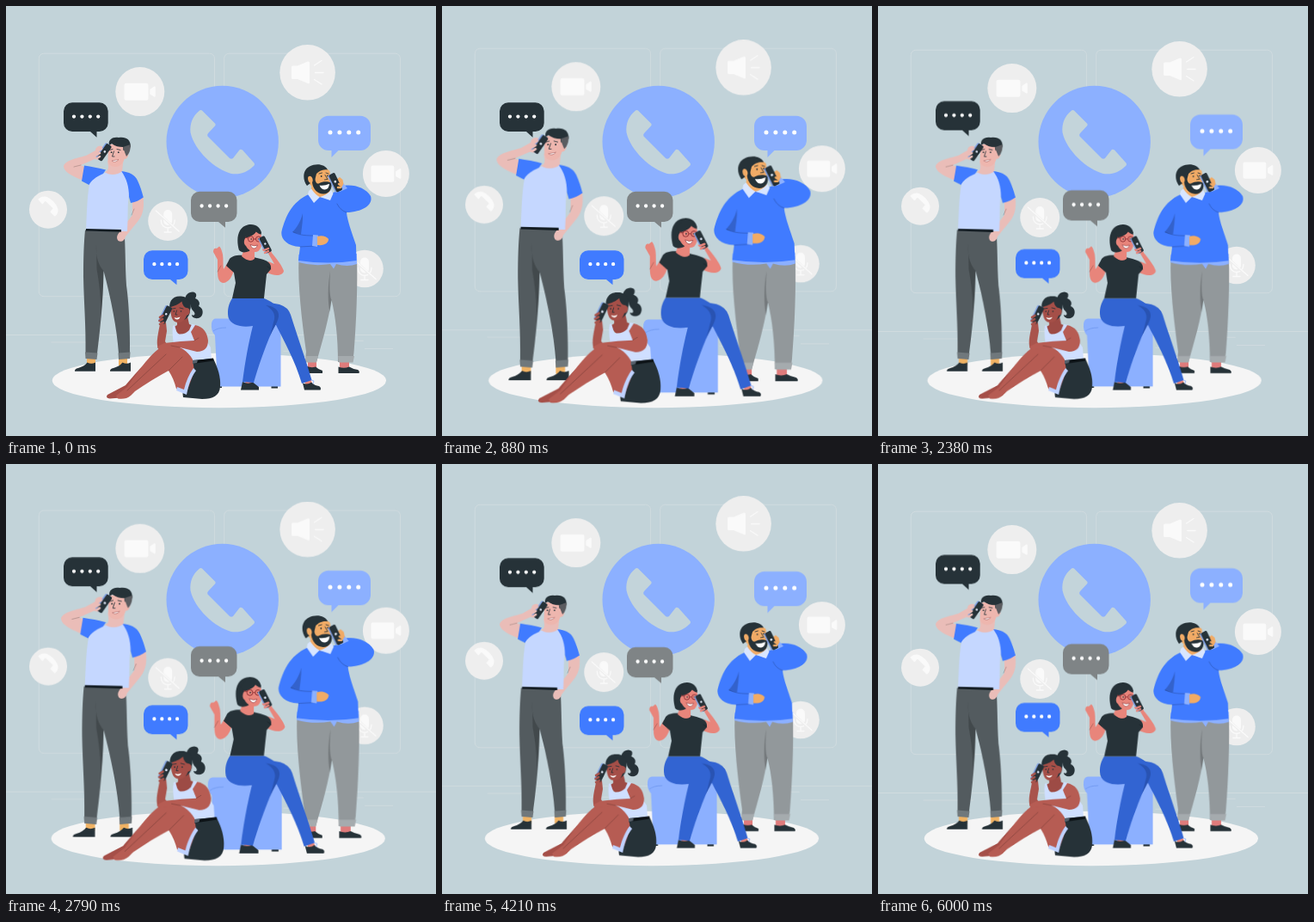
Write an HTML page that moves like this. It is 500 px wide and 500 px high and loops after 6040 ms.

```html
<!DOCTYPE html>
<html lang="en">
<head>
<meta charset="utf-8">
<title>Phone calls</title>
<style>
html, body { margin: 0; width: 100%; height: 100%; overflow: hidden; background: #c2d3d9; }
svg { display: block; width: 100vw; height: 100vh; }

.float, .bob, .shake, .beat { animation: 6.04s linear infinite; }
.float { animation-name: float; }
.bob { animation-name: bob; }
.shake { animation-name: shake; }
.beat { animation-name: beat; }

/* 3 s triangle wave */
@keyframes float {
  0%, 49.669%, 99.338% { transform: translateY(0); }
  24.834%, 74.503% { transform: translateY(-9.8px); }
  100% { transform: translateY(-.26px); }
}
/* 1 s rest, then a 1.5 s triangle wave cut off by the loop */
@keyframes bob {
  0%, 16.556%, 41.391%, 66.225%, 91.06% { transform: translateY(0); }
  28.974%, 53.808%, 78.642% { transform: translateY(-9.8px); }
  100% { transform: translateY(-7.06px); }
}
@keyframes shake {
  0%, 99.338%, 100% { transform: translateX(0); }
  9.934%, 89.404% { transform: translateX(-1px); }
  19.868%, 79.47% { transform: translateX(2px); }
  29.801%, 49.669%, 69.536% { transform: translateX(-4px); }
  39.735%, 59.603% { transform: translateX(4px); }
}
@keyframes beat {
  0%, 29.801%, 39.735%, 59.603%, 100% { transform: scale(1); }
  9.934%, 49.669% { transform: scale(1.1); }
}

.dark { fill: #263238; }
.blue { fill: #407bff; }
.soft { fill: #8cb0ff; }
.pale { fill: #c5d7ff; }
.disc { fill: #eee; }
.icon { fill: #fafafa; }
.ray { fill: none; stroke: #fafafa; stroke-width: 1.3; stroke-linecap: round; }
.dots { fill: none; stroke: #fff; stroke-width: 4.3; stroke-linecap: round; }
.thin { fill: none; stroke: #263238; stroke-width: .8; stroke-linecap: round; stroke-linejoin: round; }
.fold { fill: none; stroke: #000; stroke-opacity: .28; stroke-width: .7; stroke-linecap: round; }
.shade { fill: #000; fill-opacity: .2; }
</style>
</head>
<body>
<svg viewBox="0 0 500 500">
  <defs>
    <path id="handset" d="M224.500 122Q226.500 120 228.500 122L243 136.500Q244.500 138 243 139.500L235 148Q233.500 149.500 234.500 151.500L260 177Q262 178.500 264 177L271 168Q272.500 166 275 167.500L288 182Q290 184 288 186C281 193 272 196.500 262 195C243 190 219 168 214.500 147C213.500 137 217 128 224.500 122Z"/>
    <g id="camera">
      <rect x="-18.3" y="-9.8" width="28" height="20" rx="2.2"/>
      <path d="M11.500-2.500L16.500-6Q18-6.500 18-5V5Q18 6.500 16.500 6L11.500 3Z"/>
    </g>
    <g id="mic">
      <rect class="icon" x="-5" y="-13" width="10" height="18" rx="5"/>
      <path class="ray" d="M-8-1C-8 11 8 11 8-1M0 8V13M-4 13H4"/>
      <path d="M-13-11L13 13" fill="none" stroke="#eee" stroke-width="3"/>
      <path class="ray" d="M-14-12L13 12"/>
    </g>
    <g id="mobile">
      <rect x="-4.800" y="-10.500" width="8" height="21" rx="1.600" fill="#7e9ee0"/>
      <rect class="dark" x="-3.300" y="-10.500" width="7.200" height="21" rx="1.600"/>
      <circle cx="0.300" cy="-1" r="1.300" fill="#dfe6f5"/>
    </g>
  </defs>

  <g class="float">
    <g fill="none" stroke="#ebebeb" stroke-width=".35">
      <rect x="38.300" y="55.200" width="204.200" height="282.500" rx="5.700"/>
      <rect x="253.700" y="55.200" width="204.700" height="282.500" rx="5.700"/>
      <path d="M0 382.500H500M416.800 398.600H450M322.500 401.300h8.700M396.600 389.300h19.200M52.500 391h43.200M104.600 391h6.300M131.500 395.200h93.700"/>
    </g>
    <g class="disc">
      <circle cx="155.800" cy="99.600" r="28.500"/>
      <circle cx="350.600" cy="77.300" r="32.300"/>
      <circle cx="441.900" cy="195" r="27"/>
      <circle cx="49" cy="236.700" r="22"/>
      <circle cx="188.200" cy="250" r="23"/>
      <circle cx="417" cy="305.500" r="21.800"/>
    </g>
    <g class="icon">
      <use href="#camera" x="155.800" y="99.500"/>
      <use href="#camera" x="442" y="195" transform="translate(17.700 7.800) scale(.96)"/>
      <use href="#handset" transform="translate(127 282) rotate(180) scale(.31)"/>
      <path d="M332 71Q332 69.500 333.500 69.500H339L351 64.500Q353 64 353 66V89Q353 91 351 90L339 85H333.500Q332 85 332 83.500Z"/>
    </g>
    <path class="ray" d="M358.500 69L367 63.500M359.500 77.500H369M358.500 85.500L367 91"/>
    <use href="#mic" x="188.200" y="250"/>
    <use href="#mic" x="417" y="305.500"/>
  </g>

  <circle class="soft" cx="251.700" cy="158" r="65.200"/>
  <use href="#handset" fill="#c3d4da"/>

  <ellipse class="shake" cx="247.900" cy="435.500" rx="194.100" ry="31.700" fill="#f5f5f5"/>

  <g class="bob">
    <path class="dark" d="M77 112.300H108.700a10 10 0 0 1 10 10V136a10 10 0 0 1-10 10H105.500V152.800L98 146H77a10 10 0 0 1-10-10V122.300a10 10 0 0 1 10-10Z"/>
    <path class="dots" stroke-dasharray="0 9.400" d="M79 128.600h29"/>
    <path class="soft" d="M375 127.800H412a12 12 0 0 1 12 12V156a12 12 0 0 1-12 12H386.500L378.500 176V168H375a12 12 0 0 1-12-12V139.800a12 12 0 0 1 12-12Z"/>
    <path class="dots" stroke-dasharray="0 10.900" d="M377 147h33.500" style="stroke-width:5px"/>
    <path fill="#7f8486" d="M225 215.800H258.500a10 10 0 0 1 10 10V241a10 10 0 0 1-10 10H255V257.800L247 251H225a10 10 0 0 1-10-10V225.800a10 10 0 0 1 10-10Z"/>
    <path class="dots" stroke-dasharray="0 9.500" d="M227.600 232.500h29.500"/>
    <path class="blue" d="M170 284.300H201.500a10 10 0 0 1 10 10V308a10 10 0 0 1-10 10H198.500V324.300L191 318H170a10 10 0 0 1-10-10V294.300a10 10 0 0 1 10-10Z"/>
    <path class="dots" stroke-dasharray="0 8.900" d="M172.400 300.200h27.600"/>
  </g>

  <!-- standing man, left -->
  <g class="beat" style="transform-origin:113.200px 288.500px">
    <path d="M94 408H104V418H94ZM131 408H141V418H131Z" fill="#f0b263"/>
    <path class="dark" d="M104 414.500V424.800H80Q79.500 422 84 421Q91 419 94.500 414.500Q99 417 104 414.500ZM145 414.500V424.800H121Q120.500 422 125 421Q132 419 135.500 414.500Q140 417 145 414.500Z"/>
    <path fill="#535b5f" d="M92 260.500L137.500 261C139 280 138.500 300 140 325C143 345 144.500 380 144 404H131C129 375 122 340 113.500 308C113 345 109 380 106 404H92.500C93 370 90.500 345 90 315C90 293 90.500 276 92 260.500Z"/>
    <path class="shade" d="M105 277C104 292 108 302 113.500 308C113 330 112 345 110 364C111 340 108 320 105.500 306Z"/>
    <path fill="#70787c" d="M92 402.500L106.500 403.500L105.500 411L92.500 410ZM130.500 403.500L144.500 402.500L144 410L131 411Z"/>
    <path fill="#eabdb8" d="M147 226L159.500 222C161.500 237 158 245 152 252L139 268C138 273 134 275 130.500 273C128 270 129 266 132 263L147 243Z"/>
    <path fill="#eabdb8" d="M92 204C80 199 68 194 67 187C67 180 82 177 93 174L104 168C104 164 108 162 111 163L116 166L113 176C110 180 106 179 103 178L87 185L93 188Z"/>
    <path class="pale" d="M114 194L134 192L149 202L142.500 222C141 235 142 248 141 262L93 261C94 242 94 225 97 207L104 196Z"/>
    <path class="blue" d="M91 185.500C99 187 108 188 116 190.500L113 195C104 199 99 203 96.500 208L88 203.500ZM134 192C143 193 150 196 153 203C156 209 158 216 159.800 222.500C155 226 151 228 145 229L143 222C143 210 140 200 134 192Z"/>
    <path fill="#eabdb8" d="M118 180L137 175L135 192C130 197 119 197 115 193Q119 192 119 187Z"/>
    <path d="M93 259L134 260V262.800L93 261.500Z" fill="#111a20"/>
    <path class="fold" d="M87 185L79 187M146 243L149 236"/>
    <path fill="#eeb6ae" d="M119.500 161L118.500 177C118.500 184 122 187 127 187C133 187 136.500 182 137.500 178C142 178 144 171 140.500 169L139 160Z"/>
    <path class="dark" d="M120 162C118.500 157 122.500 151.500 131 153C140 151.500 145.500 156 144.700 164L141 168L136.500 168L136 164C131 164 127 163 123 160Z"/>
    <path d="M136 164L144.700 161C145 168 143 172 140 175L138 170Z" fill="#5b5c60"/>
    <path class="thin" d="M120.500 167.500L124 166.500M129 166.500L133 167.500M125.500 169L123.500 175H126"/>
    <path d="M123 180Q127 183 131 178.500Z" fill="#fff" stroke="#a05050" stroke-width=".5"/>
    <circle class="dark" cx="122.600" cy="170.200" r=".9"/><circle class="dark" cx="130.800" cy="170.200" r=".9"/>
    <use href="#mobile" transform="translate(114 170) rotate(35)"/>
    <path d="M106 169L111 166M105 173L109 171M106 177L109 175" stroke="#eabdb8" stroke-width="2.600" stroke-linecap="round"/>
  </g>

  <!-- standing man, right -->
  <g class="beat" style="transform-origin:372.500px 305.500px">
    <path d="M351 410H361V422H351ZM388 410H399V422H388Z" fill="#df7b7b"/>
    <path class="dark" d="M350 419Q355 421 360 419.500Q363 422.500 368 424V427H347ZM386.500 419.500Q393 422 399 419.500Q403 422 409 423Q411.500 424.500 410.500 427H386.500Z"/>
    <path fill="#92989b" d="M340.500 292H408C409 325 407.500 365 404.500 403L403 414H386C386 385 383 360 378.500 342C375 365 368 390 361 414H348L349 402C344 365 339 325 340.500 292Z"/>
    <path class="shade" d="M377 308C376 325 376 336 378.500 342L376.500 356C374 344 374 325 377 308Z"/>
    <path fill="#a5abae" d="M348.500 407H363L361 414.500H349ZM386 407H405L403.500 414.500H387Z"/>
    <path class="soft" d="M340 289L408 288L408 300Q397 304 384 300L381 305.500L377 300Q357 303 340 298Z"/>
    <path class="blue" d="M352 219C361 221 374 220 383 216L393 209C405 207 419 212 424 221C427 230 417 239 396 240C397 250 402 263 407 278L407.500 296Q375 301 340 296L342 280C326 279 319 270 320.500 262C325 245 332 228 352 219Z"/>
    <path class="shade" d="M345 241C343 250 338 258 333 263L343 265.500C344 257 345.500 249 345 241Z"/>
    <path class="fold" d="M334 263C342 267 351 267 358 267M342 280L360 279M396 240C390 238 387 234 385 230"/>
    <path class="soft" d="M357 266L363 266.500L362 280L356 279Z"/>
    <path fill="#f1ab66" d="M362 268C367 266 373 268 375 271C375 275 371 279 362 278Z"/>
    <path class="soft" d="M383 209L392 206L397 212L388 216Z"/>
    <path fill="#f1ab66" d="M356 206L376 212L379 220Q368 226 354 218Z"/>
    <path fill="#d8e5ff" d="M352 215L355 212.500Q360 220 365 222L358 229L351 219ZM378 214L380.500 218L377 226L365 222Q373 220 378 214Z"/>
    <path fill="#f1ab66" d="M353 196C348 196 347 202 352 206L357 211C365 219 378 213 378 206L376.500 192C373 187 357 186 353 196Z"/>
    <path class="dark" d="M350 209C344 201 345.500 190 353 186.500C361 182.500 371 184 374 190.500C368 189.500 364 192 361 195L359 203L356.500 204C358 199 352 195 351 200C351 203 352 205 354 206Z"/>
    <path class="dark" d="M356 205L359 200C360 206 362 207.500 364.500 206C368 203.800 374 203.500 378 205.500C380 211 376.500 218.500 369 218.500C362 218.500 357 213 356 205Z"/>
    <path d="M364.500 208.500Q370 209.500 376 206.800Q375.500 213 371 213.500Q366.500 213.500 364.500 208.500Z" fill="#fff"/>
    <path class="thin" d="M364 195L367.500 194M372 194L375 195M371 196.500L374 201.500L370.500 202"/>
    <circle class="dark" cx="366.700" cy="198" r=".9"/><circle class="dark" cx="374" cy="197.500" r=".9"/>
    <path fill="#f1ab66" d="M384 202L388 199L391.500 202L392.500 207L388 214L382 212Z"/>
    <use href="#mobile" transform="translate(383 205.300) rotate(-26) scale(1.050)"/>
    <path d="M388 203L390 207M386 211L389 211M387 207L390 209" stroke="#f1ab66" stroke-width="2.400" stroke-linecap="round"/>
  </g>

  <!-- woman on the pouf -->
  <g class="beat" style="transform-origin:302.300px 350.500px">
    <path class="dark" d="M243 440H251V444H243ZM308.500 440H316V444.500H308.500Z"/>
    <path class="soft" d="M244 363.500H315Q320 365 319.500 371V442.500H246L243 383Q238 378 239 369Q240 363.500 244 363.500Z"/>
    <path d="M241 378Q246 374 256 374" fill="none" stroke="#6e97ee" stroke-width=".7"/>
    <path fill="#e8857b" d="M346 433L354 433L357 442L349 442ZM279 432H287L286 442H278Z"/>
    <path class="dark" d="M275 437Q281 440 287 437.500L294 443V446.500H273ZM345 438.500Q351 441 355 437.500Q359 441.500 364 442Q367 443.500 365.500 446.500H347Z"/>
    <path fill="#3264d2" d="M290 342L318 347Q328 350 331 359C339 385 349 412 355.500 435L344 439C336 412 324 391 314 371L280 372Z"/>
    <path fill="#3264d2" d="M263 340H300C308 343 316 348 318 356C319 363 313 371 309 379C300 400 293 420 288 438L275 437C278 413 282 392 287 372C275 374 262 372 258.500 362C257 353 259 346 263 340Z"/>
    <path fill="#2953b2" d="M302 348C311 349 318 353 317 361C316 368 310 376 307 384L311 368C315 358 309 352 302 348Z"/>
    <path d="M355 435L358 436L357 439" class="thin" style="stroke:#8cb0ff"/>
    <path fill="#e8857b" d="M258 298L265 307C263 315 259 321 253 322C248 322 246 317 246 309L246 295L241 286C241 282 243 281 245 282L248 279.500C250 281 251 285 252 289C253 295 252 301 253 306Z"/>
    <path fill="#e8857b" d="M305 297L312 300L304 286L298 284L300 278L306 279L309 287C315 294 321 302 323 308C322 314 312 315 302 309Z"/>
    <path class="dark" d="M279 290C270 289 263 290 260 294L256 302L265 310L267 322L263 340H300C301 330 302 321 303 312L308 306C309 299 304 296 296 294Z"/>
    <path fill="#e8857b" d="M277 282L289 285V294Q283 299 274 291Z"/>
    <path class="dark" d="M271 284C267 270 270 257 281 254.500C289 252.500 296 257 297 264L291 268L283 285C278 287 274 287 271 284Z"/>
    <path fill="#e8857b" d="M280 268C284 268 289 266 291 262L296.500 265C298.500 273 298 280 294 284.500C289 288 282 285 279 279C276 277 276 271 280 268Z"/>
    <path class="dark" d="M278 270C285 268 289 265 290 262C293 264.500 295 265.500 297 265.500C296 258 289 254 281 256L275 264Z"/>
    <g fill="none" stroke="#8e3035" stroke-width=".9"><circle cx="284.700" cy="271" r="3.200"/><circle cx="293.500" cy="271" r="3"/><path d="M288 271H290.500M281.500 270L278 269"/></g>
    <circle class="dark" cx="285.200" cy="271" r=".8"/><circle class="dark" cx="293.500" cy="271" r=".8"/>
    <path d="M284 277.500Q288.500 280 292.500 278Q291 282.500 288 282Q285.500 281.500 284 277.500Z" fill="#fff" stroke="#8e3035" stroke-width=".6"/>
    <use href="#mobile" transform="translate(301.500 277.500) rotate(-27) scale(.95)"/>
    <path d="M300 284L305 282M301 287L305 285" stroke="#e8857b" stroke-width="2.400" stroke-linecap="round"/>
    <path class="fold" d="M246 309L250 302M308 306L304 303"/>
  </g>

  <!-- sitting girl -->
  <g class="beat" style="transform-origin:183.500px 395.200px">
    <path class="dark" d="M208 343C208 336 212 332.500 217 332.500C222 333 222 337 220 340C225 342 226 346 224 349C229 351 230 357 227 361C223 365 216 363 216 359C219 361 221 358 218 355C214 351 216 348 213 346Z"/>
    <path fill="#9d4b45" d="M199 364L211 361L213 370L224 374L205 386L194 374L199 371Z"/>
    <path fill="#a9544c" d="M179 370L186 368L187 378L185 390L190 398L178 400C174 394 176 385 179 370Z"/>
    <path fill="#cfdfff" d="M196 371L199 381Q207 383 213 377L216 370L221 371L238 397L239 412L217 416L196 398C194 389 193 380 194 372Z"/>
    <path class="dark" d="M217 412L241 410C246 420 250 431 249 443C248 453 241 457 228 457L206 455C204 446 209 431 217 412Z"/>
    <path fill="#a54f48" d="M190 396C171 402 153 425 139 441L118 452Q115 456 121 456.500L139 455L150 446L205 407Z"/>
    <path fill="#b65c53" d="M183 395C197 391 211 400 217 411L219 425L210 449L198 445C196 437 193 430 189 424C176 431 163 439 150 448L145 453Q139 458 130 456.500L128 453L141 443C152 428 166 405 183 395Z"/>
    <path fill="#bfd2ff" d="M218 421L221 424C214 433 212 443 210 452L198 447L199 443L207 446C209 437 213 428 218 421Z"/>
    <path fill="#0c1216" d="M217 412.500L241 409.500L241.500 412.500L217 416Z"/>
    <path d="M217 412L223 411.500L222 415L217 416Z" fill="#56606b"/>
    <path fill="#b65c53" d="M220 371C230 373 234 380 235 389C235 397 231 402 222 402L202 397L184 399Q176 400 176 396L184 392L203 390L219 389L215 379Z"/>
    <path class="fold" d="M219 389L224 386M202 397L192 395M189 424L205 408M141 447L186 405"/>
    <path class="dark" d="M191 355C188 345 193 337 203 337.500C212 337 217 346 214 354C214 359 211 363 207 365Z"/>
    <path fill="#a54f48" d="M191.500 350C195 349 201 347 204.500 343.500C205 348 208 351 210 351C215 351 215 359 210 360C208 366 204 368.500 199 368C193 367 191 360 191.500 350Z"/>
    <path class="thin" d="M193.500 352L197 351.500M202 351L206 352M198.500 354L197 359H199"/>
    <circle class="dark" cx="195.300" cy="355" r=".8"/><circle class="dark" cx="203.500" cy="355" r=".8"/>
    <path d="M195.500 362Q199 363.500 202.500 361.500Q201.500 364.500 199 364.500Q196.500 364.500 195.500 362Z" fill="#fff"/>
    <use href="#mobile" transform="translate(185.500 359) rotate(26)"/>
    <path d="M179 362L182.500 360M178.500 366L182 364M179 370L183 368" stroke="#a9544c" stroke-width="2.600" stroke-linecap="round"/>
  </g>
</svg>
</body>
</html>
```
